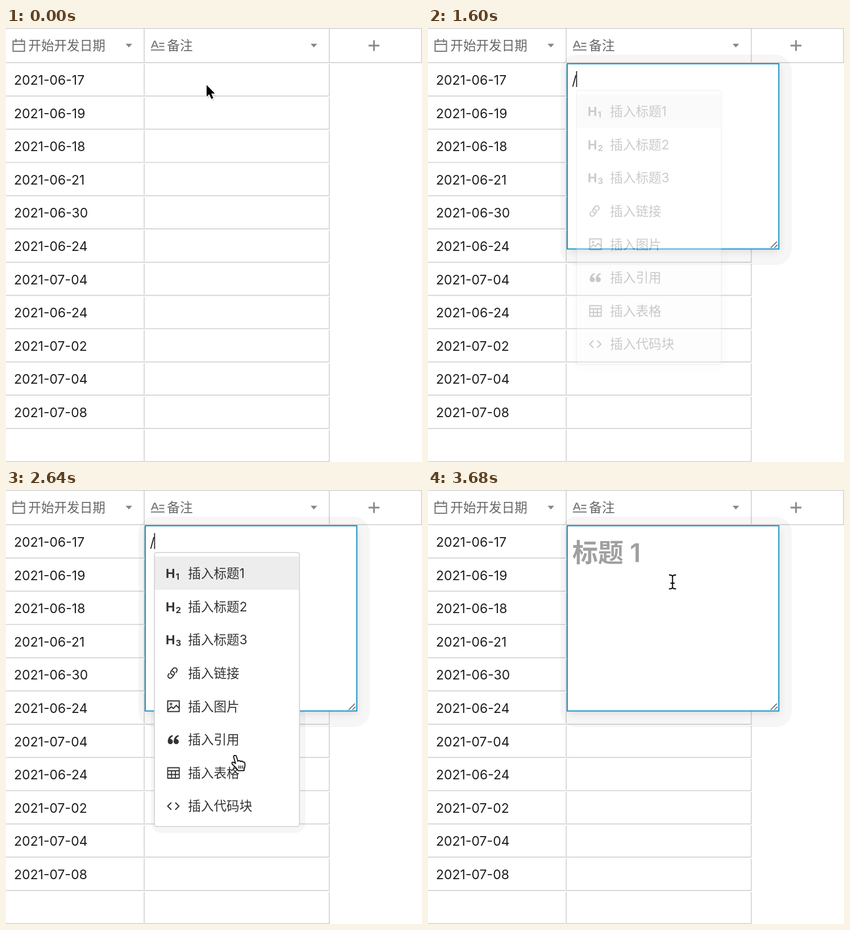
Animation, 732 px wide and 765 px high, one loop 4120 ms. Source, as an HTML page:

```html
<!DOCTYPE html>
<html lang="zh-CN">
<head>
<meta charset="utf-8">
<title>表格备注</title>
<style>
  html, body { margin: 0; width: 100%; height: 100%; overflow: hidden; background: #fff; }
  svg { display: block; width: 100%; height: 100%; }
  text { font: 22.6px Inter, "Noto Sans CJK SC", "Noto Sans CJK", sans-serif; }
  .line { fill: none; stroke-linecap: round; stroke-linejoin: round; }
  .hint { fill: #a0a0a0; }
</style>
</head>
<body>
<svg viewBox="0 0 732 765" xmlns="http://www.w3.org/2000/svg">
  <defs>
    <filter id="soft" x="-20%" y="-20%" width="140%" height="140%"><feGaussianBlur stdDeviation="7"/></filter>
    <filter id="tiny" x="-40%" y="-40%" width="180%" height="180%"><feGaussianBlur stdDeviation="1.4"/></filter>
    <path id="beamShape" d="M-5.5-12.3C-2.5-12.3 0-11.5 0-9C0-11.5 2.5-12.3 5.5-12.3M0-9V9M-5.5 12.3C-2.5 12.3 0 11.5 0 9C0 11.5 2.5 12.3 5.5 12.3M-3 2.2H3"/>
    <path id="arrowShape" d="M0 0V20.5L4.7 16.2L8.3 24.6L11.8 23.1L8.2 14.9H14.6Z"/>
  </defs>

  <rect id="rowTint" y="62" width="242" height="57" fill="#f4f4f4"/>
  <g id="grid"></g>

  <g fill="none" stroke="#7a7a7a" stroke-width="2.1">
    <path d="M12.5 23H32.5V41H12.5ZM12.5 29H32.5M17.5 19V25.5M27.5 19V25.5"/>
    <path d="M256 35.5L261 23.5H262.5L267.5 35.5M258 31.5H265.5M269.5 27H278.5M269.5 32.5H278.5M255 38.7H279"/>
  </g>
  <g fill="#666">
    <text x="39.3" y="39.4">开始开发日期</text>
    <text x="283.3" y="39.4">备注</text>
  </g>
  <path d="M210.5 27.8H222L216.2 34.2ZM536 27.8H547.5L541.7 34.2Z" fill="#868686"/>
  <path d="M638 31H657M647.5 21.5V40.5" stroke="#888" stroke-width="2.8"/>

  <g id="cell">
    <rect x="245" y="63" width="323" height="55.3" fill="#f4f4f4" stroke="#1795ca" stroke-width="2"/>
    <rect x="559.5" y="109" width="9.5" height="9.8" fill="#1795ca"/>
  </g>

  <rect id="menuHalo" x="255" y="380" width="272" height="225" rx="20" opacity=".036"/>

  <g id="editor">
    <rect x="233" y="47" width="407" height="371" rx="28" opacity=".036"/>
    <rect x="247" y="70" width="371" height="324" rx="6" opacity=".1" filter="url(#soft)"/>
    <rect x="245" y="63" width="372.3" height="326.5" fill="#fff" stroke="#1795ca" stroke-width="2"/>
    <path d="M603 387.5L614 376.5M609.5 387.5L615 382" stroke="#555" stroke-width="1.4"/>
    <g id="prompt" class="hint">
      <text x="253.6" y="99.8">输入文字或</text>
      <text x="374" y="99.8">`/`</text>
      <text x="408.8" y="99.8">插入富文本内容</text>
    </g>
    <text id="heading" class="hint" x="254" y="126.5" style="font-size:45px;font-weight:600">标题 1</text>
    <text id="slash" x="253.3" y="100.5" fill="#222" style="font-size:23.5px">/</text>
    <rect id="caret" width="1.7" fill="#222"/>
  </g>

  <g id="menu">
    <rect x="261.2" y="110.2" width="255.2" height="483" rx="4" fill="#fff" stroke="#cfcfcf" stroke-width="1.6"/>
    <rect x="262" y="117.3" width="253.8" height="58.6" fill="#ededed"/>
    <g id="items" fill="#333"></g>
    <g class="line" stroke="#333" stroke-width="2">
      <g transform="translate(293 322.6) rotate(-52)">
        <path d="M4.5 4H6.5A4 4 0 0 0 6.5-4H1A4 4 0 0 0-2.4 2"/>
        <path d="M4.5 4H6.5A4 4 0 0 0 6.5-4H1A4 4 0 0 0-2.4 2" transform="rotate(180)"/>
      </g>
      <path d="M284.5 371.8H304.8V390.5H284.5ZM285 387.5L291 382L294.5 385.3L299.5 379.5L304.5 384.5"/>
      <circle cx="290.3" cy="377.3" r="1.6" stroke-width="1.5"/>
      <path d="M284.5 489.5H304.8V508H284.5ZM284.5 495H304.8M284.5 501.5H304.8M291.3 495V508M298 495V508" stroke-width="1.8"/>
      <path d="M290.3 551.5L284.5 557.2L290.3 563M298.5 551.5L304.3 557.2L298.5 563"/>
    </g>
    <g id="quotes" fill="#333"></g>
  </g>

  <g id="arrow">
    <use href="#arrowShape" x="1" y="2.5" opacity=".35" filter="url(#tiny)"/>
    <use href="#arrowShape" stroke="#fff" stroke-width="3.2"/>
    <use href="#arrowShape"/>
  </g>
  <g id="beam" class="line">
    <use href="#beamShape" stroke="#fff" stroke-width="4.2"/>
    <use href="#beamShape" stroke="#000" stroke-width="1.9"/>
  </g>
  <g id="hand" class="line" stroke="#000" stroke-width="1.7">
    <path fill="#fff" d="M-2.4 2C-2.8-1 1.6-2 2.6 1L5 9.5C6 8 9 8 9.8 10C11 8.8 13.4 9 14.2 11C15.6 10.4 17.2 11.2 17.4 13C18 17 17.6 20 16 23V26H5C4.5 23 1 20-3 16.5C-7 13-5.5 10-2 11.5L1 13.5Z"/>
    <path d="M7 17.5V22M10.3 17.5V22M13.6 17.5V22" stroke-width="1.4"/>
  </g>
</svg>
<script>
const LOOP = 4120, STEP = 40, ROW = 58.6, TOP = 61.2;
const $ = id => document.getElementById(id);
const rowY = i => TOP + i * ROW;

function buildGrid() {
  const days = ['06-17', '06-19', '06-18', '06-21', '06-30', '06-24',
                '07-04', '06-24', '07-02', '07-04', '07-08'];
  let lines = `M0 .6H732M0 ${TOP}H732M243.2 0V${TOP}M568.8 0V${TOP}M731.3 0V${TOP}`;
  let labels = '';
  for (let i = 0; i < 12; i++) {
    const y = rowY(i), end = rowY(i + 1);
    lines += `M0 ${end}H569.5M243.2 ${y + 2.6}V${end - 1.5}M568.8 ${y + 2.6}V${end}`;
    if (days[i]) labels += `<text x="14" y="${y + 38.8}" style="font-size:23px">2021-${days[i]}</text>`;
  }
  $('grid').innerHTML =
    `<path d="${lines}" stroke="#d3d3d3" stroke-width="1.7"/><g fill="#1f1f1f">${labels}</g>`;
}

function buildMenu() {
  const names = ['标题1', '标题2', '标题3', '链接', '图片', '引用', '表格', '代码块'];
  $('items').innerHTML = names.map((name, i) => {
    const y = 155.2 + i * ROW;
    const icon = i < 3
      ? `<text x="281" y="${y}" style="font-size:22px;font-weight:700">H</text>` +
        `<text x="298.5" y="${y + 3}" style="font-size:15px;font-weight:700">${i + 1}</text>`
      : '';
    return `${icon}<text x="320.3" y="${y}">插入${name}</text>`;
  }).join('');
  $('quotes').innerHTML = [289.2, 299.6].map(x =>
    `<g transform="translate(${x} 443.6)"><circle r="4.5"/>` +
    '<path d="M-4.5 0C-4.5-6-1.5-10.5 3.8-11.6L4.4-9.4C1.5-8.3 0-6.3-.3-4Z"/></g>').join('');
}

const show = (id, on) => $(id).setAttribute('visibility', on ? 'visible' : 'hidden');
const within = (t, a, b) => t >= a && t < b;
const clamp = u => Math.min(1, Math.max(0, u));
const ease = u => u * u * (3 - 2 * u);

// Pointer sweeps down the menu and returns to the first entry.
function pointer(t) {
  if (t < 2440) return [353, 100.5];
  if (t >= 3280) return [430.3, 162];
  const u = clamp((t - 2440) / 520);
  const x = 352 + 76 * ease(clamp(u * 1.6));
  const y = u < .5 ? 108 + 417 * ease(u * 2) : 525 - 362 * ease(u * 2 - 1);
  return [x, y];
}

function placeCaret(t) {
  const on = within(t, 600, 1080) || within(t, 1560, 2080) ||
             within(t, 2560, 3040) || within(t, 3160, 3680);
  const big = t >= 3160, caret = $('caret');
  caret.setAttribute('x', within(t, 1560, 3160) ? 260.6 : 254);
  caret.setAttribute('y', big ? 81 : 76);
  caret.setAttribute('height', big ? 54 : 28);
  show('caret', on);
}

function draw(time) {
  const t = Math.floor((time % LOOP) / STEP) * STEP;
  const menuOn = within(t, 1600, 3160);
  const fade = clamp((t - 1560) / 160);

  show('rowTint', within(t, 120, 560));
  show('cell', within(t, 120, 560));
  show('editor', t >= 560);
  show('prompt', within(t, 560, 1560));
  show('slash', within(t, 1560, 3160));
  show('heading', t >= 3160);
  show('menu', menuOn);
  show('menuHalo', menuOn);
  $('menu').setAttribute('opacity', fade);
  $('menuHalo').setAttribute('opacity', .036 * fade);
  placeCaret(t);

  const [x, y] = pointer(t);
  const overMenu = within(t, 2440, 3280) && y > 118;
  const typing = within(t, 1560, 2440);
  show('arrow', t < 480);
  show('beam', t >= 480 && !typing && !overMenu);
  show('hand', overMenu);
  for (const id of ['arrow', 'beam', 'hand'])
    $(id).setAttribute('transform', `translate(${x} ${y})`);
}

buildGrid();
buildMenu();
const start = performance.now();
function tick() {
  draw(performance.now() - start);
  requestAnimationFrame(tick);
}
tick();
</script>
</body>
</html>
```
